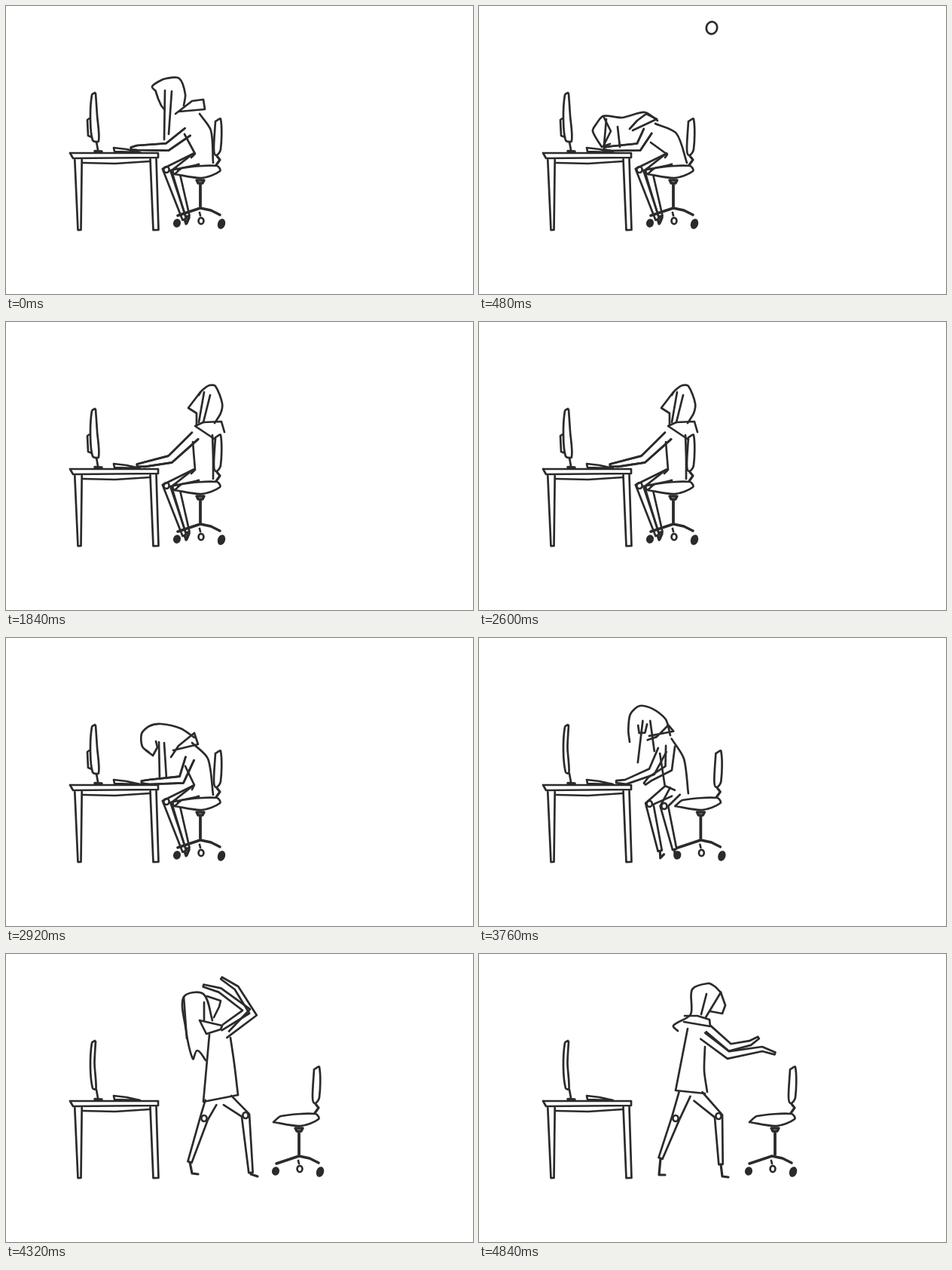
These frames come from a looping animation (620 px wide and 382 px high, 5.04 s). An HTML page with a canvas:

```html
<!DOCTYPE html>
<html lang="en">
<head>
<meta charset="utf-8">
<title>Desk rage</title>
<style>
  html, body { margin: 0; width: 100%; height: 100%; overflow: hidden; background: #fff; }
  canvas { display: block; }
</style>
</head>
<body>
<canvas id="stage" width="620" height="382"></canvas>
<script>
const ctx = document.getElementById('stage').getContext('2d');
const INK = '#2b2b2b', LINE = 2.7, LOOP = 5040;

const lerp = (a, b, k) => a + (b - a) * k;
const clamp = v => Math.max(0, Math.min(1, v));
const tick = (t, phase = 0) => Math.floor((t - phase) / 80) * 80 + phase;
const points = text => text.split(' ').map(p => p.split(',').map(Number));

const SIT = {
  legA: '252,203 213,217 237,283 239,289 243,280',
  legB: '252,203 225,219 241,279 243,281 240,288'
};
// Key poses; every part keeps its number of points so that poses can be blended.
const POSES = [
  { ...SIT,
    hair: '199,113 194,107 203,100 213,96 230,96 238,117 236,132',
    face: '199,114 202,123 206,132 210,137',
    locks: '211,112 210,177 220,113 216,170',
    collar: '225,143 247,126 262,124 264,137 230,140',
    back: '257,143 272,165 275,208', front: '237,170 251,196 246,201',
    arm: '241,167 214,187 174,188 166,189' },
  { ...SIT,
    hair: '163,187 151,166 156,156 165,146 190,148 220,141 237,152',
    face: '165,146 175,166 165,186 174,183',
    locks: '169,150 166,185 184,160 187,187',
    collar: '200,163 210,152 222,143 236,150 204,165',
    back: '234,156 262,169 276,208', front: '228,181 250,197 247,201',
    arm: '224,166 212,187 176,189 166,189' },
  { ...SIT,
    hair: '256,97 260,91 270,84 278,85 287,108 285,121 277,134',
    face: '258,93 242,114 253,121 253,137',
    locks: '263,93 256,133 271,97 262,133',
    collar: '278,156 251,138 262,133 286,132 290,146',
    back: '274,150 275,180 275,208', front: '248,159 251,196 246,201',
    arm: '251,151 218,182 184,189 174,190' },
  { ...SIT,
    hair: '190,152 181,144 180,127 190,117 206,114 232,120 250,132',
    face: '186,149 195,156 201,145 199,137',
    locks: '203,138 204,187 210,139 213,186',
    collar: '219,158 229,143 250,126 255,141 222,149',
    back: '247,139 268,160 275,208', front: '238,170 250,195 247,201',
    arm: '244,160 233,188 190,191 180,191' },
  { hair: '218,113 229,85 238,55 255,42 274,58 276,86 261,124',
    face: '256,57 244,73 255,91 266,74',
    locks: '243,60 223,126 258,58 268,86',
    collar: '232,95 248,110 254,97 264,93 233,96',
    back: '271,124 279,160 283,203', front: '244,123 241,198 283,203',
    arm: '242,128 223,158 203,191 186,190', armB: '272,114 285,146 292,180 291,198',
    legA: '251,203 250,225 246,281 244,297 250,299',
    legB: '275,203 283,230 293,283 290,296 299,298' },
  { hair: '265,141 254,128 248,139 238,95 236,57 262,53 274,88',
    face: '267,56 285,62 283,70 276,84',
    locks: '236,57 240,112 263,64 263,88',
    collar: '257,88 287,95 285,100 266,106 257,88',
    back: '298,111 303,145 308,187', front: '270,107 262,196 308,187',
    arm: '290,106 328,80 306,45 286,32', armB: '292,98 319,74 284,48 262,42',
    legA: '272,197 263,218 244,276 247,291 255,292',
    legB: '294,194 318,214 325,290 325,292 334,295' },
  { hair: '264,102 258,95 281,80 283,47 304,39 313,43 321,51',
    face: '321,51 327,68 323,79 307,76',
    locks: '321,51 301,84 302,53 295,80',
    collar: '273,82 290,82 306,87 307,96 272,90',
    back: '300,123 299,155 303,183', front: '277,99 261,181 300,185',
    arm: '298,108 331,134 376,126 393,132', armB: '304,100 333,124 360,118 371,111',
    legA: '273,186 261,218 241,271 239,293 247,293',
    legB: '291,189 318,215 321,279 323,295 331,296' }
].map(pose => Object.fromEntries(
  Object.entries({ armB: pose.arm, ...pose }).map(([name, text]) => [name, points(text)])));

// When each next pose is approached, in ms.
const MOVES = [[0, 320], [1420, 1840], [2700, 2880], [3700, 4000], [4000, 4320], [4320, 4800]];

const progress = t => MOVES.reduce(
  (sum, [from, to]) => sum + 1 - (1 - clamp((t - from) / (to - from))) ** 2, 0);

function poseAt(pos) {
  const i = Math.min(Math.floor(pos), POSES.length - 2), k = pos - i, pose = {};
  for (const name in POSES[i])
    pose[name] = POSES[i][name].map(([x, y], n) => {
      const [toX, toY] = POSES[i + 1][name][n];
      return [lerp(x, toX, k), lerp(y, toY, k)];
    });
  return pose;
}

function line(pts, width = LINE) {
  ctx.lineWidth = width;
  ctx.beginPath();
  pts.forEach(p => ctx.lineTo(...p));
  ctx.stroke();
}

// Smooth line; handles shrink with their segment, so close points stay crisp.
function curve(pts, fill) {
  const last = pts.length - 1;
  const handle = (i, reach) => {
    const a = pts[Math.max(0, i - 1)], b = pts[Math.min(last, i + 1)];
    const k = reach / (Math.hypot(b[0] - a[0], b[1] - a[1]) || 1);
    return [pts[i][0] + (b[0] - a[0]) * k, pts[i][1] + (b[1] - a[1]) * k];
  };
  ctx.lineWidth = LINE;
  ctx.beginPath();
  ctx.moveTo(...pts[0]);
  for (let i = 0; i < last; i++) {
    const reach = Math.hypot(pts[i + 1][0] - pts[i][0], pts[i + 1][1] - pts[i][1]) * .27;
    ctx.bezierCurveTo(...handle(i, reach), ...handle(i + 1, -reach), ...pts[i + 1]);
  }
  if (fill) {
    ctx.fillStyle = fill;
    ctx.fill();
  }
  ctx.stroke();
}

// Outline around a chain of joints, with a half width at each joint.
function limb(joints, halves) {
  const side = sign => joints.map(([x, y], i) => {
    const a = joints[Math.max(0, i - 1)], b = joints[Math.min(joints.length - 1, i + 1)];
    const angle = Math.atan2(b[1] - a[1], b[0] - a[0]);
    return [x - Math.sin(angle) * halves[i] * sign, y + Math.cos(angle) * halves[i] * sign];
  });
  line([...side(1), ...side(-1).reverse()]);
}

function ellipse(x, y, rx, ry, tilt, filled) {
  ctx.lineWidth = LINE;
  ctx.fillStyle = INK;
  ctx.beginPath();
  ctx.ellipse(x, y, rx, ry, tilt, 0, 7);
  filled ? ctx.fill() : ctx.stroke();
}

function drawDesk(seated) {
  line(points('85,195 202,195 202,201 89,202 85,195'));
  line(points('102,208 145,209 191,206'));
  limb(points('96,204 97.5,297'), [4.7, 2]);
  limb(points('195.5,203 199,297'), [4, 3.5]);
  const foot = seated ? 123 : 119.5;
  curve([[118, 115], [114, 118], [112, 150], [115, 178], [foot, 179], [foot - 2, 145], [119, 116]]);
  if (seated) line(points('111,149 108,151 109,172 114,174'));
  line(points('120,180 122,191'));
  line(points('118,192.5 127,193'), 3.6);
  line(points('143,188 144,193 178,194 160,190 143,188'));
}

function drawChair(pos) {
  ctx.save();
  ctx.translate(101 * clamp(pos - 3) + 30 * clamp(pos - 4), 0);
  line(points('228,278 258,268 272,271 284,277'), 3.6);
  ellipse(227, 288, 5, 5.8, .3, true);
  ellipse(286, 289, 5, 7, .3, true);
  ellipse(259, 285, 3.4, 4.2, 0, false);
  line(points('257,274 258,278'));
  ctx.translate(4 * clamp(pos - 5), 0);
  curve(points('278,153 285,150 285,190 279,198 276,190 278,153'));
  line(points('280,199 284,204 279,211'), 3.2);
  curve(points('224,223 234,215 280,212 284,219 260,228 224,223'), '#fff');
  line(points('258,237 258,266'), 3.8);
  line(points('253,231 263,231 261,235 255,235 253,231'), 3.4);
  ctx.restore();
}

function drawLeg(joints) {
  limb(joints.slice(0, 3), [8, 5.3, 2.7]);
  line(joints.slice(2), 3.2);
  ellipse(...joints[1], 3.6, 4, 0, false);
}

function drawBody({ hair, face, locks, collar, back, front, arm, armB }) {
  curve(back);
  line(front);
  for (const a of [arm, armB]) limb(a, [6, 5, 3, 1.5]);
  line(collar);
  curve(hair);
  line(face);
  line(locks.slice(0, 2));
  line(locks.slice(2));
}

// The loose key: thrown over the chair, one bounce on the floor, out to the right.
function drawKey(t) {
  if (t < 360 || t >= 1320) return;
  const bounced = t > 780;
  const x = bounced ? 583 + (t - 1080) * .285 : 397 + (t - 600) * .55;
  const y = bounced ? 193 + 100 * ((1280 - t) / 506) ** 2
                    : 29 + 264 * (Math.abs(t - 440) / 340) ** 1.2;
  ellipse(x, y, 8.2, 7.2, -.5 + (t - 1080) / 160, false);
}

function frame(now) {
  const t = now % LOOP, pos = progress(tick(t)), pose = poseAt(pos);
  ctx.fillStyle = '#fff';
  ctx.fillRect(0, 0, 620, 382);
  ctx.strokeStyle = INK;
  ctx.lineCap = ctx.lineJoin = 'round';
  drawDesk(pos <= 3);
  drawLeg(pose.legA);
  drawLeg(pose.legB);
  drawChair(pos);
  drawBody(pose);
  drawKey(tick(t, 40));
  requestAnimationFrame(frame);
}
requestAnimationFrame(frame);
</script>
</body>
</html>
```
